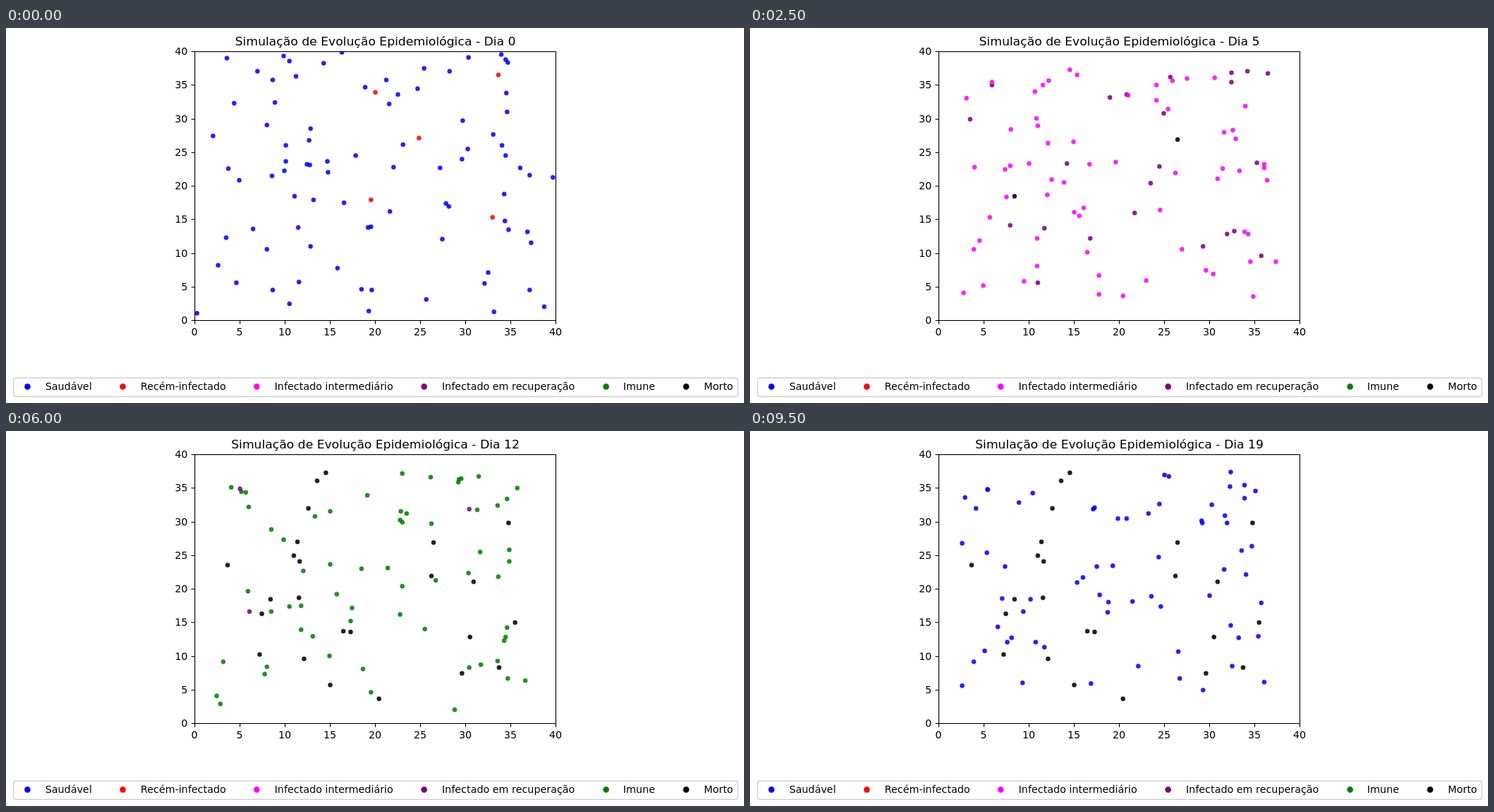
Animation of 1014x516 px, one loop 10 s. Source, as an HTML page:

```html
<!DOCTYPE html>
<html lang="pt">
<head>
<meta charset="utf-8">
<title>Simulação de Evolução Epidemiológica</title>
<style>
html, body { margin: 0; width: 100%; height: 100%; overflow: hidden; background: #fff; }
svg { display: block; font: 13.89px "DejaVu Sans", sans-serif; }
</style>
</head>
<body>
<svg id="stage" width="1014" height="516" viewBox="0 0 1014 516">
  <clipPath id="plot"><rect x="259.5" y="32.5" width="496" height="370"/></clipPath>
  <text id="title" x="507.5" y="24" font-size="16.67" text-anchor="middle"></text>
  <g id="dots" clip-path="url(#plot)" opacity="1" fill-opacity=".8" stroke-opacity=".8" stroke-width="2"></g>
  <rect x="259.5" y="32.5" width="496" height="370" fill="none" stroke="#000" stroke-width="1.1"/>
  <rect x="10.5" y="481.5" width="995" height="25.5" rx="3" fill="#fff" stroke="#ccc" stroke-opacity=".9" stroke-width="1.3"/>
</svg>
<script>
const DAYS = 20, DAY_MS = 500, POPULATION = 90;
const stage = document.getElementById('stage');
const title = document.getElementById('title');
const group = document.getElementById('dots');

const px = x => 259.5 + 12.4 * x;
const py = y => 402.5 - 9.25 * y;
const snap = v => Math.floor(v) + .5;

function add(parent, tag, attrs, text = '') {
  const el = document.createElementNS('http://www.w3.org/2000/svg', tag);
  for (const key in attrs) el.setAttribute(key, attrs[key]);
  el.textContent = text;
  return parent.appendChild(el);
}

// Axes and legend
for (let v = 0; v <= 40; v += 5) {
  add(stage, 'path', { d: `M${snap(px(v))} 402.5v5M259.5 ${snap(py(v))}h-5`, stroke: '#000', 'stroke-width': 1.1 });
  add(stage, 'text', { x: px(v) - .5, y: 423, 'text-anchor': 'middle' }, v);
  add(stage, 'text', { x: 249.7, y: Math.floor(py(v)) + 5, 'text-anchor': 'end' }, v);
}
[
  [29.5, 54, 'blue', 'Saudável'],
  [160.5, 185, 'red', 'Recém-infectado'],
  [344.5, 369, 'magenta', 'Infectado intermediário'],
  [574.5, 599, 'purple', 'Infectado em recuperação'],
  [824.5, 848, 'green', 'Imune'],
  [934.5, 959, 'black', 'Morto']
].forEach(([cx, x, fill, label]) => {
  add(stage, 'circle', { cx, cy: 493.5, r: 4.17, fill });
  add(stage, 'text', { x, y: 498 }, label);
});

// Seeded random walk, steered back inside the 2..38 band
let seed = 11;
function random() {
  seed = seed + 0x6D2B79F5 | 0;
  let t = Math.imul(seed ^ seed >>> 15, seed | 1);
  t ^= t + Math.imul(t ^ t >>> 7, t | 61);
  return ((t ^ t >>> 14) >>> 0) / 4294967296;
}
function step(v) {
  const d = random() * 4 - 2;
  if (v + d < 2) return v + Math.abs(d);
  if (v + d > 38) return v - Math.abs(d);
  return v + d;
}

// The first cases; everyone else starts anywhere and is infected on days 1 to 4
const firstCases = [[33.6, 36.5], [20, 34], [24.8, 27.1], [19.5, 17.9], [33, 15.3]];

function caseDay(i) {
  const u = i * .618034 % 1; // golden-ratio spread keeps the daily shares steady
  return u < .2 ? 1 : u < .44 ? 2 : u < .88 ? 3 : 4;
}
function makePerson(i) {
  const first = i < firstCases.length;
  const day = first ? 0 : caseDay(i);
  const dies = !first && i % 7 < 2;
  const death = dies ? day + 3 + Math.floor(random() * 6) : Infinity;
  const path = [first ? firstCases[i] : [random() * 40, random() * 40]];
  for (let d = 1; d < DAYS; d++) {
    const last = path[d - 1];
    path.push(d < death ? last.map(step) : last);
  }
  return { path, day, death };
}
const people = Array.from({ length: POPULATION }, (_, i) => makePerson(i));

function colour({ day, death }, today) {
  const age = today - day;
  if (today >= death) return 'black';
  if (age < 0 || age > 14) return 'blue';
  return age < 1 ? 'red' : age < 4 ? 'magenta' : age < 9 ? 'purple' : 'green';
}

const dots = people.map(() => add(group, 'circle', { r: 2.2 }));
let shown = -1;
function draw(today) {
  title.textContent = `Simulação de Evolução Epidemiológica - Dia ${today}`;
  people.forEach((person, i) => {
    const [x, y] = person.path[today], c = colour(person, today), dot = dots[i];
    dot.setAttribute('cx', snap(px(x)));
    dot.setAttribute('cy', snap(py(y)));
    dot.setAttribute('fill', c);
    dot.setAttribute('stroke', c);
  });
}
function tick() {
  const today = Math.floor(performance.now() / DAY_MS) % DAYS;
  if (today !== shown) draw(shown = today);
  requestAnimationFrame(tick);
}
tick();
</script>
</body>
</html>
```
